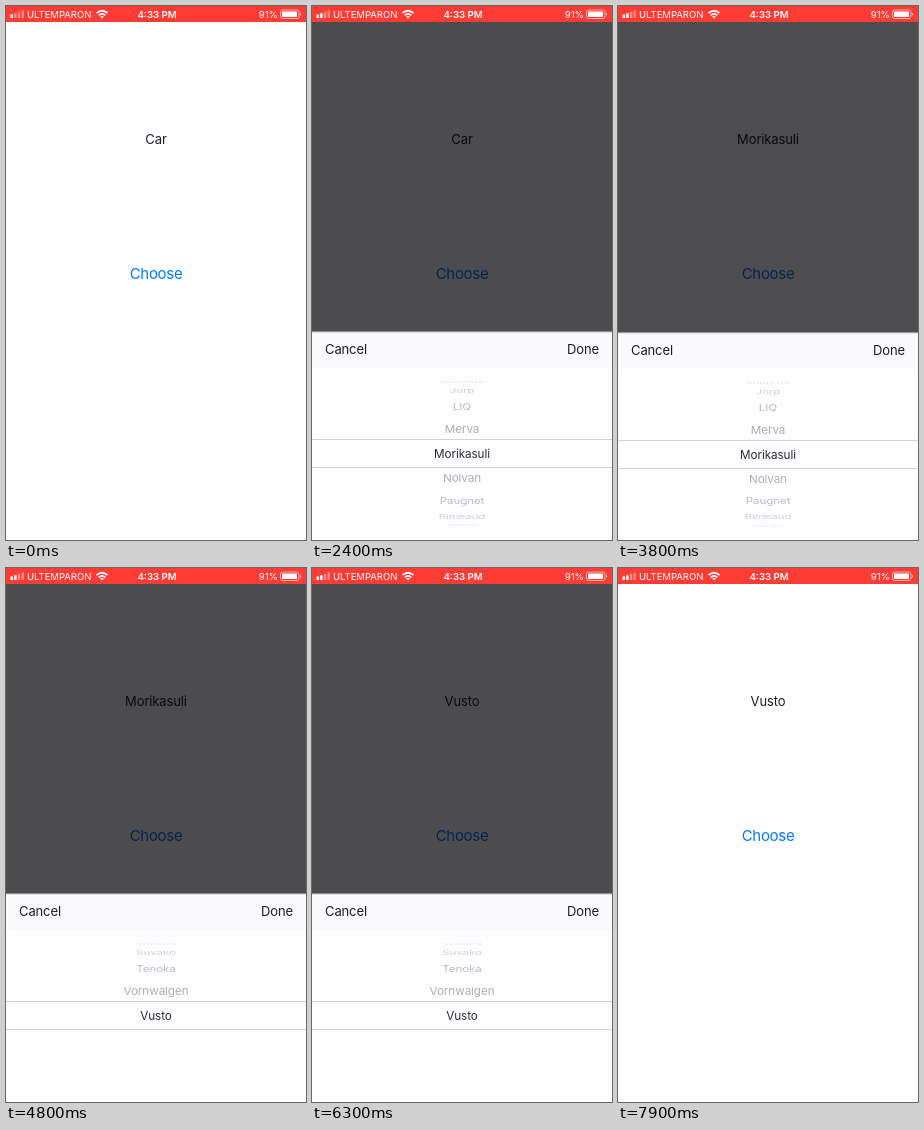
An HTML page that plays this animation: 300x534 px, repeating every 8 s.

```html
<!DOCTYPE html>
<html lang="en">
<head>
<meta charset="utf-8">
<title>Car picker</title>
<style>
html, body { margin: 0; width: 100%; height: 100%; overflow: hidden; background: #fefdff; }
svg { display: block; font: 13px Inter, "Open Sans", sans-serif; letter-spacing: -.12px; fill: #1c1b1d; }
.mid { text-anchor: middle; }
#choose { font-size: 15px; letter-spacing: -.3px; fill: #007aff; }
#wheel { font-size: 11.7px; letter-spacing: -.08px; }
#status { font-size: 9.6px; letter-spacing: 0; fill: #fff; }
</style>
</head>
<body>
<svg width="300" height="534" viewBox="0 0 300 534">
  <rect width="300" height="534" fill="#fefdff"/>
  <text id="label" class="mid" x="150" y="138"></text>
  <text id="choose" class="mid" x="150" y="272.5">Choose</text>
  <rect id="dim" width="300" height="534" fill="#020003"/>
  <g id="sheet">
    <rect width="300" height="208" fill="#fefdff"/>
    <rect width="300" height="35.5" fill="#faf9fb"/>
    <path d="M0 0H300" stroke="#cccbce"/>
    <text x="13" y="22.3">Cancel</text>
    <text x="287" y="22.3" text-anchor="end">Done</text>
    <path d="M0 107.5H300M0 135.5H300" stroke="#d3d2d5"/>
    <g id="wheel" class="mid"></g>
  </g>
  <g id="status">
    <rect width="300" height="16" fill="#fe3c36"/>
    <g id="bars">
      <rect x="4.5" y="8.5" width="2.4" height="3.5"/>
      <rect x="8.2" y="7.2" width="2.4" height="4.8"/>
      <rect x="11.9" y="5.8" width="2.4" height="6.2" opacity=".4"/>
      <rect x="15.6" y="4.4" width="2.4" height="7.6" opacity=".4"/>
    </g>
    <text x="21" y="11.7" font-size="9.5">ULTEMPARON</text>
    <path d="M90.5 7.2Q96 2.3 101.5 7.2M92.7 9.3Q96 6.3 99.3 9.3" fill="none" stroke="#fff" stroke-width="1.7"/>
    <path d="M94.2 10.6Q96 9 97.8 10.6L96 12.4Z"/>
    <text class="mid" x="151" y="11.6" font-weight="600">4:33 PM</text>
    <text x="272" y="11.7" text-anchor="end">91%</text>
    <rect x="274.5" y="4" width="18.5" height="8.5" rx="2" fill="none" stroke="#fff" stroke-width=".8" stroke-opacity=".7"/>
    <rect x="276" y="5.5" width="15" height="5.5" rx=".8"/>
    <path d="M294.2 6.8Q296 8.2 294.2 9.7Z"/>
  </g>
</svg>
<script>
const LOOP = 8000, ROW_ANGLE = Math.PI / 9, RADIUS = 72.5;
const cars = ['Ambrix', 'Arveno', 'BWQ', 'Carvolet', 'Dorvane', 'Fenrik', 'Gorva', 'Haldro',
  'Holmeda', 'Imbretta', 'Jorp', 'LIQ', 'Merva', 'Morikasuli', 'Nolvan', 'Paugnet', 'Rimeaud',
  'Sorlet', 'Studaro', 'Suvako', 'Tenoka', 'Vornwalgen', 'Vusto'];

// Segments: start, duration, from, to
const slides = [[700, 400, 0, 1], [2550, 320, 1, 0], [3420, 400, 0, 1],
  [5230, 320, 1, 0], [5880, 400, 0, 1], [7450, 350, 1, 0]];
const spins = [[1420, 520, 0, 7], [2130, 300, 7, 13], [3830, 520, 13, 22],
  [4540, 120, 22, 22.4], [4660, 180, 22.4, 22], [6330, 440, 22, 15], [6770, 420, 15, 9]];
const taps = [600, 3350, 5850];

const $ = id => document.getElementById(id);
const clamp = x => Math.min(1, Math.max(0, x));
const easeInOut = x => x < .5 ? 2 * x * x : 1 - 2 * (1 - x) ** 2;
const easeOut = x => 1 - (1 - x) ** 3;

function track(segments, t, ease) {
  const [start, length, from, to] = segments.findLast(s => s[0] <= t) || segments[0];
  return from + (to - from) * ease(clamp((t - start) / length));
}

const rows = cars.map(name => {
  const row = document.createElementNS('http://www.w3.org/2000/svg', 'text');
  row.textContent = name;
  row.setAttribute('y', 4.2);
  return $('wheel').appendChild(row);
});

function drawWheel(position) {
  rows.forEach((row, i) => {
    const offset = i - position, angle = offset * ROW_ANGLE, depth = Math.cos(angle);
    const visible = Math.abs(offset) < 4.4, chosen = Math.abs(offset) < .5;
    row.style.display = visible ? '' : 'none';
    if (!visible) return;
    const y = 121.6 + RADIUS * Math.sin(angle);
    row.setAttribute('transform', `translate(150 ${y}) scale(${.96 + .04 * depth} ${depth})`);
    row.style.fill = chosen ? '#2c2b2e' : '#8e8d92';
    row.style.opacity = chosen ? 1 : .1 + .65 * depth;
  });
}

function draw(t) {
  const open = track(slides, t, easeInOut);
  $('dim').style.opacity = .7 * open;
  $('sheet').setAttribute('transform', `translate(0 ${open ? 326 + 208 * (1 - open) : 540})`);
  $('label').textContent = t < 2550 ? 'Car' : t < 5230 ? cars[13] : cars[22];
  const tap = taps.findLast(start => start <= t) ?? -LOOP;
  $('choose').style.opacity = .25 + .75 * clamp((t - tap - 50) / 250);
  $('bars').children[1].style.opacity = t < 150 ? .4 : 1;
  drawWheel(track(spins, t, easeOut));
}

const begin = performance.now();
function frame() {
  draw((performance.now() - begin) % LOOP);
  requestAnimationFrame(frame);
}
frame();
</script>
</body>
</html>
```
